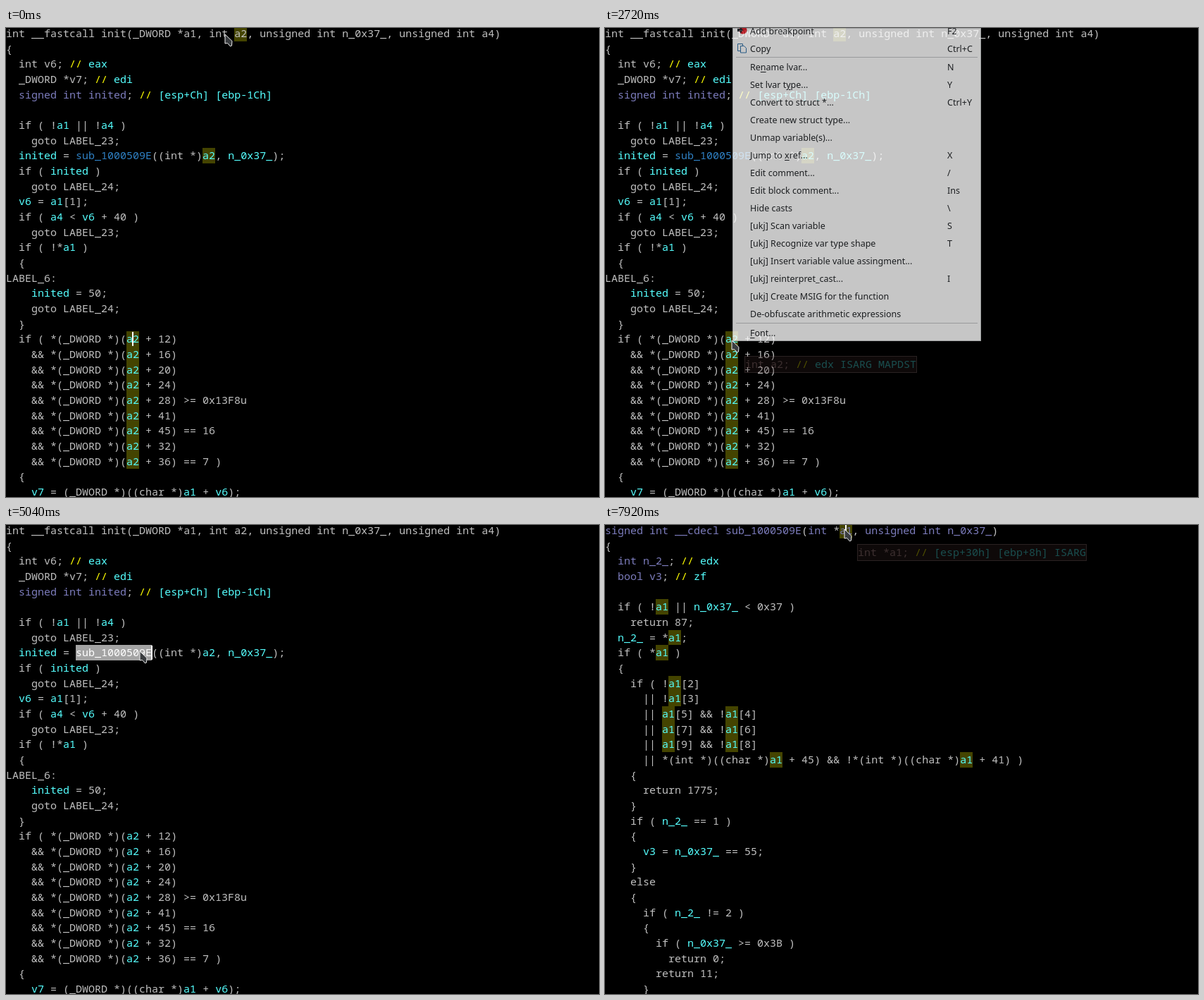
Animation of 842 by 665 pixels, one loop 8 s. Source, as an HTML page:

```html
<!DOCTYPE html>
<html lang="en">
<head>
<meta charset="utf-8">
<title>Decompiler view</title>
<style>
  html, body { margin: 0; width: 100%; height: 100%; overflow: hidden; background: #000; }
  #stage { position: relative; width: 842px; height: 665px; overflow: hidden; background: #000; }
  #stage > * { position: absolute; }
  pre, #tip { margin: 0; font: 15px/21.667px "Noto Sans Mono", monospace; white-space: pre; color: #c0c0c0; }
  pre { left: 0; top: -3px; }
  pre span { display: inline-block; vertical-align: top; }
  .var, .note { color: #55ffff; }
  .mark { color: #ffff00; }
  .typed { color: #7c7cbc; }
  .func { color: #2f80c4; }
  .hit { background: #444400; }
  .selected { background: #a4a4a4; color: #fff; }
  #caret { width: 2px; height: 20px; background: #fff; }
  #tip { height: 22px; border: 1px solid #8a7070; background: #2e1e20; color: #c89c9c; }
  #menu { left: 181px; top: 0; width: 353px; height: 443.5px; overflow: hidden; background: #fcfcfc;
    box-shadow: inset 0 0 0 1px #c8cacc; font: 12.5px/25px "Noto Sans", sans-serif; color: #232629; }
  #menu > * { position: absolute; }
  .item { left: 0; width: 353px; height: 25px; white-space: pre; }
  .item span { position: absolute; left: 25px; }
  .item .key { left: 305px; }
  .item.hover { background: #3daee9; color: #fcfcfc; }
  .item u { text-underline-offset: 2px; }
  .line { left: 5px; width: 343px; height: 1px; background: #c2c4c6; }
  #icons { left: 6px; top: 0; }
  #pointer { left: -2px; top: -2px; }
</style>
</head>
<body>
<div id="stage">
  <pre></pre>
  <pre></pre>
  <div id="caret"></div>
  <div id="tip"></div>
  <div id="menu">
    <svg id="icons" width="16" height="40">
      <circle cx="9" cy="3" r="5.5" fill="#d8222c"/>
      <path d="M1 1h4v-3l4 5-4 5V5H1z" fill="#2b2b30"/>
      <g fill="#fcfcfc" stroke="#3272a8">
        <path d="M1.5 22.5h7v10h-7z"/>
        <path d="M5.5 25.5h5l3 3v6.500h-8z"/>
      </g>
    </svg>
  </div>
  <svg id="pointer" width="16" height="22">
    <path d="M2 2V15L5.500 14.500 9.500 19 11.500 18 12 11.500Z" fill="#3a3d40" stroke="#f0f0f0" stroke-linejoin="round"/>
  </svg>
</div>
<script>
const LOOP = 8000, STEP = 80, ROW = 21.667;
const $ = id => document.getElementById(id);

const views = [{
  plain: [0, 2, 3], typed: [4],
  code: `int __fastcall init(_DWORD *a1, int a2, unsigned int n_0x37_, unsigned int a4)
{
  int v6; // eax
  _DWORD *v7; // edi
  signed int inited; // [esp+Ch] [ebp-1Ch]

  if ( !a1 || !a4 )
    goto LABEL_23;
  inited = sub_1000509E((int *)a2, n_0x37_);
  if ( inited )
    goto LABEL_24;
  v6 = a1[1];
  if ( a4 < v6 + 40 )
    goto LABEL_23;
  if ( !*a1 )
  {
LABEL_6:
    inited = 50;
    goto LABEL_24;
  }
  if ( *(_DWORD *)(a2 + 12)
    && *(_DWORD *)(a2 + 16)
    && *(_DWORD *)(a2 + 20)
    && *(_DWORD *)(a2 + 24)
    && *(_DWORD *)(a2 + 28) >= 0x13F8u
    && *(_DWORD *)(a2 + 41)
    && *(_DWORD *)(a2 + 45) == 16
    && *(_DWORD *)(a2 + 32)
    && *(_DWORD *)(a2 + 36) == 7 )
  {
    v7 = (_DWORD *)((char *)a1 + v6);`
}, {
  plain: [], typed: [0, 2, 3],
  code: `signed int __cdecl sub_1000509E(int *a1, unsigned int n_0x37_)
{
  int n_2_; // edx
  bool v3; // zf

  if ( !a1 || n_0x37_ < 0x37 )
    return 87;
  n_2_ = *a1;
  if ( *a1 )
  {
    if ( !a1[2]
      || !a1[3]
      || a1[5] && !a1[4]
      || a1[7] && !a1[6]
      || a1[9] && !a1[8]
      || *(int *)((char *)a1 + 45) && !*(int *)((char *)a1 + 41) )
    {
      return 1775;
    }
    if ( n_2_ == 1 )
    {
      v3 = n_0x37_ == 55;
    }
    else
    {
      if ( n_2_ != 2 )
      {
        if ( n_0x37_ >= 0x3B )
          return 0;
        return 11;
      }`
}];

// '&' precedes an underlined letter
const items = [
  ["Add breakpoint", "F2"], ["Copy", "Ctrl+C"],
  ["Re&name lvar...", "N"], ["Set lvar t&ype...", "Y"], ["Convert to struct *...", "Ctrl+Y"],
  ["Create new struct type..."], ["Unmap variable(s)..."], ["Jump to &xref...", "X"],
  ["Edit comment...", "/"], ["Edit block comment...", "Ins"], ["Hide casts", "\\"],
  ["[ukj] Scan variable", "S"], ["[ukj] Recognize var type shape", "T"],
  ["[ukj] Insert variable value assingment..."], ["[ukj] reinterpret_cast...", "I"],
  ["[ukj] Create MSIG for the function"], ["De-obfuscate arithmetic expressions"], ["&Font..."]
];

// Editor states: highlighted word, caret [x, row], index of the selected occurrence
const states = [
  { at: 0, view: 0, word: "a2", caret: [179, 20] },
  { at: 240, view: 0, word: "", caret: [306, 0] },
  { at: 320, view: 0, word: "int", caret: [306, 0] },
  { at: 720, view: 0, word: "int", caret: [314, 0], selected: 1 },
  { at: 2320, view: 0, word: "", caret: [179, 20] },
  { at: 2400, view: 0, word: "a2", caret: [179, 20] },
  { at: 2640, view: 0, word: "a2" },
  { at: 3920, view: 0, word: "a2", caret: [179, 20] },
  { at: 4720, view: 0, word: "", caret: [189, 8] },
  { at: 4800, view: 0, word: "sub_1000509E", caret: [189, 8] },
  { at: 5040, view: 0, word: "sub_1000509E", caret: [206, 8], selected: 0 },
  { at: 5100, view: 1, word: "signed", caret: [0, 0] },
  { at: 6560, view: 1, word: "", caret: [341, 0] },
  { at: 6720, view: 1, word: "a1", caret: [341, 0] }
];

// Tracks: [time, ...values]
const pointerTrack = [
  [0, 311, 9], [240, 308, 7], [640, 309, 7], [720, 313, 6], [880, 316, 8], [1200, 259, 217],
  [1520, 185, 460], [1680, 184, 452], [1840, 183, 447], [1920, 183, 447], [2000, 180, 443],
  [2960, 180, 443], [3520, 273, 275], [3760, 273, 275], [4080, 234, 232], [4640, 190, 179],
  [5760, 190, 179], [6240, 354, 22], [6560, 350, 8], [6720, 348, 8], [7440, 341, 7], [7680, 340, 6]
];
const menuTrack = [[2560, 0], [2720, .79], [2800, 1], [3760, 1], [4000, 0]];
const tipTrack = [
  [1920, 0], [2000, .33], [2160, 1], [2560, 1], [2720, .3], [2800, 0], [7840, 0], [7920, .3]
];
const tips = [
  { text: "int a2; // edx ISARG MAPDST", x: 198, y: 465 },
  { text: "int *a1; // [esp+30h] [ebp+8h] ISARG", x: 358, y: 27 }
];

function add(parent, tag, className, text = "") {
  const el = document.createElement(tag);
  el.className = className;
  el.textContent = text;
  parent.append(el);
  return el;
}

function wordClass(word, kind) {
  if (kind) return kind;
  if (/^(a\d|v\d|n_\w+|inited)$/.test(word)) return "var";
  return word.startsWith("sub_") ? "func" : "";
}

function writeLine(parent, line, kind) {
  const [code, note] = line.split("//");
  for (const token of code.match(/\w+|\W+/g) || []) {
    if (/\w/.test(token)) add(parent, "span", wordClass(token, kind), token);
    else parent.append(token);
  }
  if (note) {
    add(parent, "span", "mark", "//");
    add(parent, "span", "note", note);
  }
}

const panes = [...document.querySelectorAll("pre")];
views.forEach((view, v) => view.code.split("\n").forEach((line, row) => {
  const kind = view.typed.includes(row) ? "typed" : view.plain.includes(row) ? "plain" : "";
  writeLine(panes[v], line, kind);
  panes[v].append("\n");
}));
const words = panes.map(pane => [...pane.querySelectorAll("span")]);

const rows = items.map(([label, key = ""], i) => {
  const row = add($("menu"), "div", "item");
  row.style.top = (i < 2 ? -8.5 + 25 * i : i < 17 ? 25 * i - 7 : 420) + "px";
  const [before, after = ""] = label.split("&");
  const text = add(row, "span", "", before);
  add(text, "u", "", after.slice(0, 1));
  text.append(after.slice(1));
  add(row, "span", "key", key);
  return row;
});
for (const y of [41, 418]) add($("menu"), "div", "line").style.top = y + "px";
$("menu").append($("icons"));

function sample(track, t) {
  const next = track.findIndex(key => key[0] > t);
  if (next === 0) return track[0].slice(1);
  if (next < 0) return track[track.length - 1].slice(1);
  const a = track[next - 1], b = track[next];
  const k = (t - a[0]) / (b[0] - a[0]);
  return a.slice(1).map((value, i) => value + (b[i + 1] - value) * k);
}

function place(el, x, y) {
  el.style.transform = `translate(${x}px, ${y}px)`;
}

function drawEditor(t) {
  const state = states.filter(s => s.at <= t).pop();
  panes.forEach((pane, i) => pane.hidden = i !== state.view);
  panes.forEach((pane, i) => pane.style.display = i === state.view ? "" : "none");
  let count = 0;
  for (const el of words[state.view]) {
    const hit = el.textContent === state.word;
    const selected = hit && count++ === state.selected;
    el.classList.toggle("hit", hit && !selected);
    el.classList.toggle("selected", selected);
  }
  const lit = state.caret && (t - state.at) % 1000 < 500;
  $("caret").style.opacity = lit ? 1 : 0;
  if (lit) place($("caret"), state.caret[0], state.caret[1] * ROW - 2.5);
}

let shownTip = null;
function drawTip(t) {
  const tip = tips[t < 5000 ? 0 : 1];
  if (tip !== shownTip) {
    shownTip = tip;
    $("tip").textContent = "";
    writeLine($("tip"), tip.text, "plain");
    place($("tip"), tip.x, tip.y);
  }
  $("tip").style.opacity = sample(tipTrack, t)[0];
}

function drawMenu(t, x, y) {
  $("menu").style.opacity = sample(menuTrack, t)[0];
  rows.forEach(row => {
    const top = parseFloat(row.style.top);
    row.classList.toggle("hover", x > 181 && y < 443 && y >= top && y < top + 25);
  });
}

function frame() {
  const t = Math.floor(performance.now() % LOOP / STEP) * STEP;
  const [x, y] = sample(pointerTrack, t);
  drawEditor(t);
  drawTip(t);
  drawMenu(t, t < 3840 ? x : 273, t < 3840 ? y : 275);
  place($("pointer"), Math.round(x), Math.round(y));
  requestAnimationFrame(frame);
}
frame();
</script>
</body>
</html>
```
